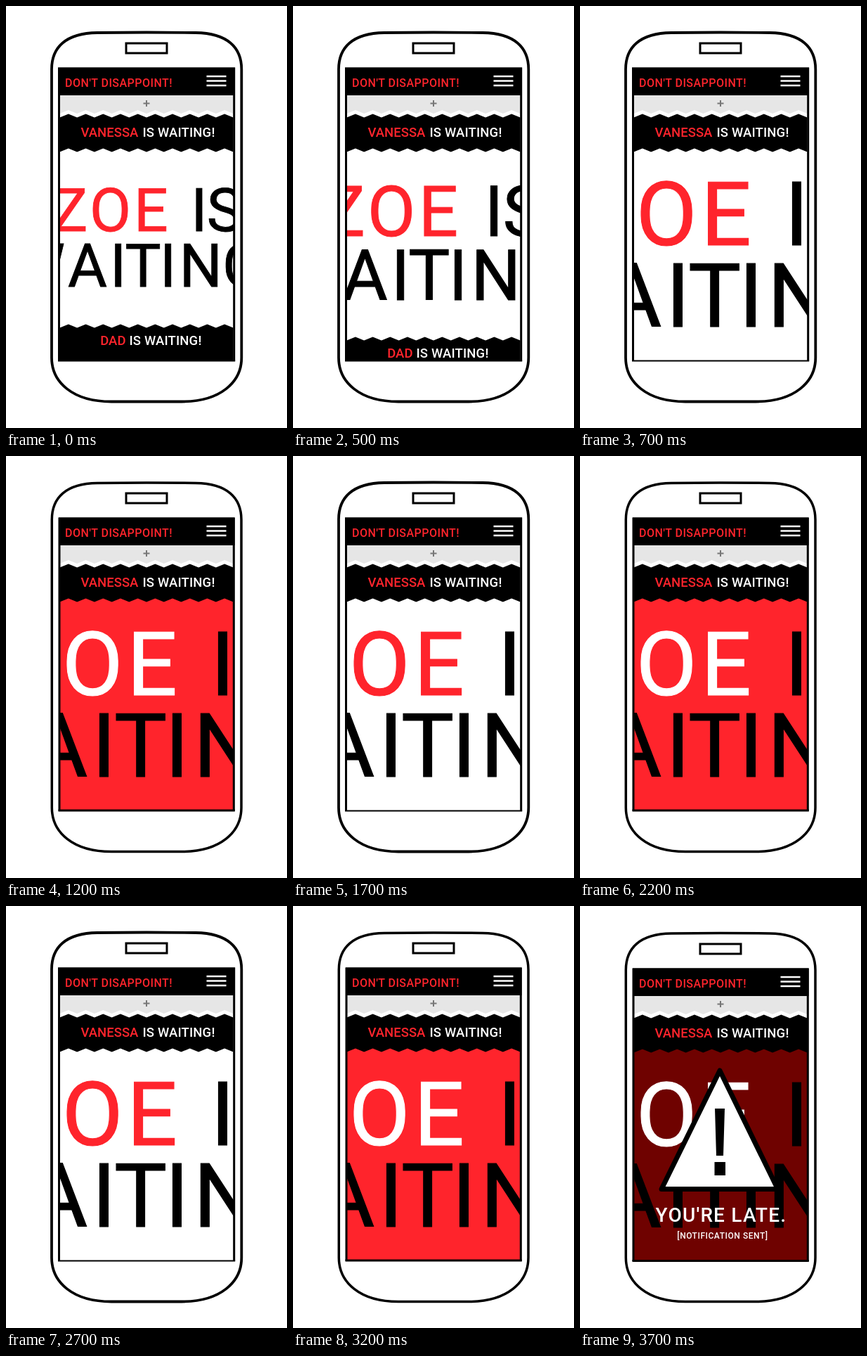
These frames come from a looping animation (400x600 px, 6.7 s). An HTML page:

```html
<!DOCTYPE html>
<html lang="en">
<head>
<meta charset="utf-8">
<title>Don't disappoint</title>
<style>
  html, body { margin: 0; width: 100%; height: 100%; overflow: hidden; background: #fff; }
  svg { display: block; width: 400px; height: 600px; }
  text { font-family: Roboto, "Open Sans", sans-serif; font-weight: 500; white-space: pre; }
  .big { font-size: 126px; font-weight: 400; text-anchor: middle; fill: currentColor; stroke: currentColor; stroke-width: 1.2; }
  .line { font-size: 18.5px; letter-spacing: .15px; fill: #fff; }
  .name { fill: #ff242c; letter-spacing: 0; }
</style>
</head>
<body>
<svg viewBox="0 0 400 600">
  <defs><clipPath id="screen"><rect x="76" y="88" width="248.5" height="417"/></clipPath></defs>
  <rect width="400" height="600" fill="#fff"/>
  <path id="phone" fill="#fff" stroke="#000"/>
  <rect id="speaker" x="171" width="58" height="14" fill="#fff" stroke="#000" stroke-width="3"/>

  <g clip-path="url(#screen)">
    <rect id="back" x="76" y="180" width="249" height="326"/>
    <g id="zoom"><g id="who"></g><g id="wait" color="#000"></g></g>
    <g id="last">
      <path id="lastBar"/>
      <text class="line name" x="170.5" y="482" text-anchor="end">DAD</text>
      <text class="line" x="175.5" y="482">IS WAITING!</text>
    </g>
  </g>

  <g id="top">
    <rect x="77" y="127" width="246" height="34" fill="#fff"/>
    <path id="add" fill="#e6e6e6"/>
    <path d="M195.5 138.5h9M200 134v9" stroke="#777" stroke-width="2"/>
    <path id="band"/>
    <rect id="head" y="87.5" height="39.5"/>
    <text x="84" y="115" font-size="16" letter-spacing=".45" fill="#ff242c">DON'T DISAPPOINT!</text>
    <path d="M285.5 100h28M285.5 106.5h28M285.5 113h28" stroke="#fff" stroke-width="2.6"/>
    <text class="line name" x="106.5" y="186">VANESSA</text>
    <text class="line" x="194.5" y="186">IS WAITING!</text>
  </g>
  <path id="frame" fill="none" stroke="#000" stroke-width="3"/>
  <path id="foot" stroke="#000"/>

  <g id="alert">
    <path d="M199 234L281.5 402.5H116Z" fill="#fff" stroke="#000" stroke-width="7" stroke-linejoin="round"/>
    <path d="M192 288h14l-2 67h-10zM191.5 364h15.5v19h-15.5z"/>
    <g fill="#fff" text-anchor="middle">
      <text x="201" y="448.5" font-size="28" letter-spacing="1.2">YOU'RE LATE.</text>
      <text x="203" y="473" font-size="12" font-weight="700" letter-spacing=".55">[NOTIFICATION SENT]</text>
    </g>
  </g>
</svg>
<script>
const $ = id => document.getElementById(id);
const set = (id, attrs) => {
  for (const key in attrs) $(id).setAttribute(key, attrs[key]);
};
const show = (id, on) => set(id, { visibility: on ? 'visible' : 'hidden' });
const mix = (a, b, p) => a + (b - a) * p;

const LOOP = 6700, RED = '#ff242c';
const TEETH = 10, LEFT = 76.5, RIGHT = 323.5;

// Saw-tooth edge, alternating between y + 5 and y
function teeth(y) {
  const pts = [];
  for (let i = 0; i <= TEETH * 2; i++) {
    const x = mix(LEFT, RIGHT, i / (TEETH * 2));
    pts.push(x.toFixed(2) + ' ' + (y + (i + 1) % 2 * 5));
  }
  return pts;
}
const strip = (above, below) => 'M' + above.concat(below.reverse()).join('L') + 'Z';
const flat = y => [LEFT + ' ' + y, RIGHT + ' ' + y];

set('add', { d: strip(flat(127), teeth(148)) });
set('band', { d: strip(teeth(153.5), teeth(202.5)) });
set('lastBar', { d: strip(teeth(452.5), flat(510)) });

// Letters are placed by their centres at full zoom
function letters(id, word, centres, y) {
  $(id).innerHTML += [...word].map((ch, i) =>
    `<text class="big" x="${centres[i]}" y="${y}">${ch}</text>`).join('');
}
letters('who', 'ZOE', [38, 123, 208], 340);
letters('wait', 'IS', [308.5, 362], 340);
letters('wait', 'WAITING', [-28, 75, 139.5, 191.5, 243.5, 312, 400], 456);

function phone(l, r, t) {
  return `M${l} ${t + 52}C${l} ${t + 21} 85 ${t + .5} 130 ${t}Q200 ${t - 1} 270 ${t}` +
    `C315 ${t + .5} ${r} ${t + 21} ${r} ${t + 52}V500C${r} 535 305 562.5 250 562.5` +
    `H150C95 562.5 ${l} 535 ${l} 500Z`;
}

function draw(t) {
  const late = t >= 3700;
  const flash = !late && t >= 1200 && Math.floor((t - 1200) / 500) % 2 === 0;
  const lit = late || flash;
  const step = t < 500 ? 0 : Math.min(3, Math.floor((t - 500) / 100) + 1);
  const p = step / 3;
  const dy = late ? 1 : 0;

  set('phone', {
    d: lit ? phone(65.3, 335, 38.5 + dy / 2) : phone(65, 335.3, 38),
    'stroke-width': lit ? 3.5 : 3.8
  });
  set('speaker', { y: 53 + dy });
  set('back', { fill: late ? '#6f0200' : flash ? RED : '#fff' });
  set('who', { color: lit ? '#fff' : RED });

  const k = mix(.681, 1, p);
  set('zoom', { transform: `translate(${mix(64.8, 0, p)} ${mix(88.4, dy, p)}) scale(${k})` });
  set('last', { transform: `translate(0 ${54 * p})` });
  show('last', step < 3);

  set('top', { transform: `translate(0 ${dy})` });
  set('head', { x: lit ? 75 : 74, width: lit ? 250.5 : 252 });
  const l = lit ? 76 : 75.5, r = lit ? 324.3 : 324.7, y = late ? 90 : 89, end = late ? 505 : 504.5;
  set('frame', { d: `M${l} ${end}V${y}H${r}V${end}` });
  set('foot', {
    d: `M${l - 1.5} ${lit ? end - .5 : end}H${r + 1.5}`,
    'stroke-width': lit ? 3 : 2
  });
  show('alert', late);
}

const start = performance.now();
function tick() {
  draw((performance.now() - start) % LOOP);
  requestAnimationFrame(tick);
}
tick();
</script>
</body>
</html>
```
